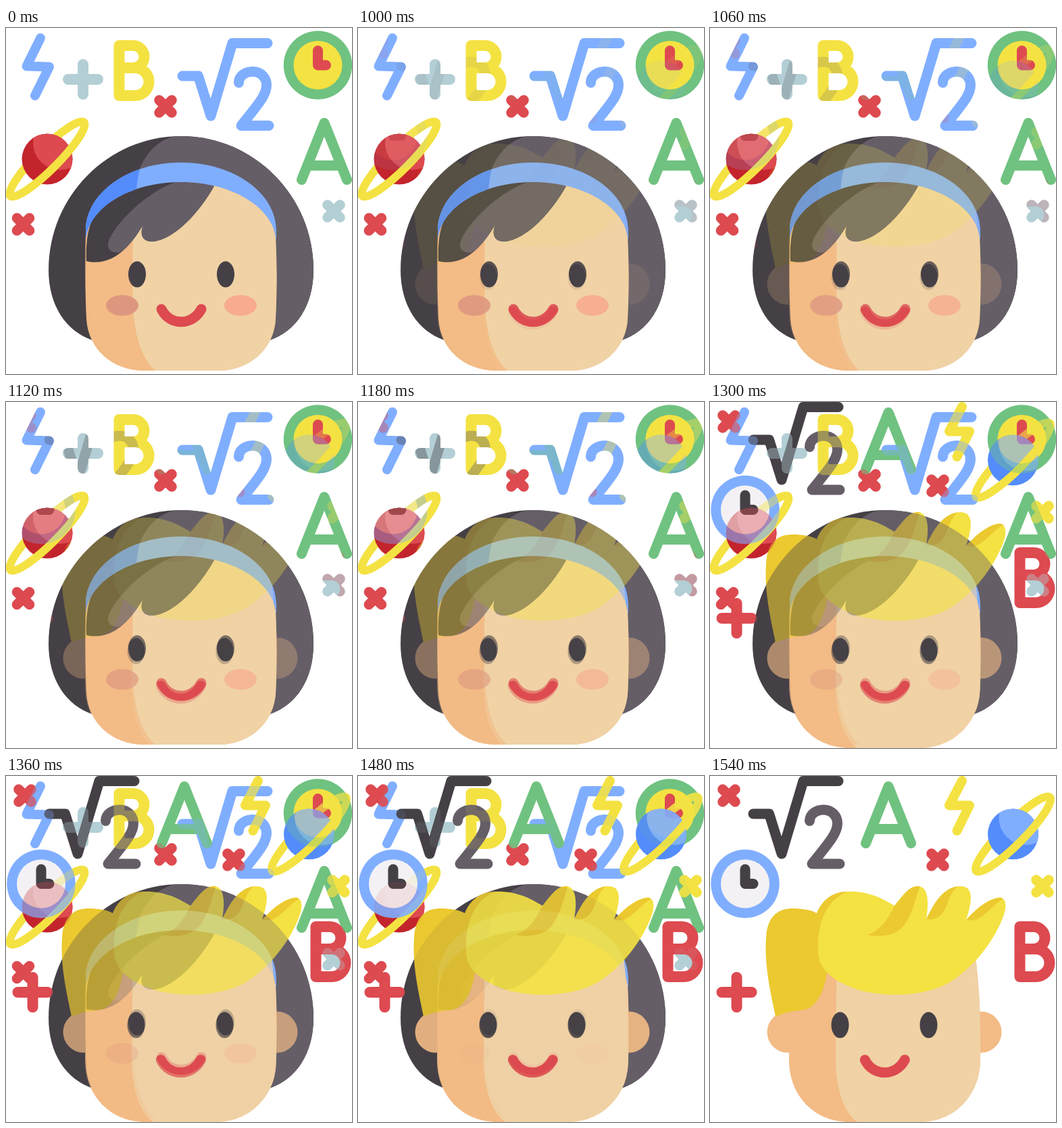
Write an HTML page with a canvas that moves like this. It is 512 px wide and 512 px high and loops after 2540 ms.

```html
<!DOCTYPE html>
<html lang="en">
<head>
<meta charset="utf-8">
<title>Students</title>
<style>
  html, body { margin: 0; width: 100%; height: 100%; overflow: hidden; background: #fff; }
  canvas { display: block; width: 100vw; height: 100vh; }
</style>
</head>
<body>
<canvas id="stage" width="512" height="512"></canvas>
<script>
const SIZE = 512;
const HOLD = 1000, STEP = 60, STEPS = 9, LOOP = 2540;

const C = {
  blue: '#80aeff', deepBlue: '#548cfb', yellow: '#f4e242', gold: '#ebc92f',
  red: '#dd4a50', deepRed: '#c4242c', green: '#70c280', mist: '#b3cfd5',
  dark: '#454045', grey: '#655e67', skin: '#f0d2a5', shade: '#f3bb85', pale: '#f3f1f3'
};

const GLYPH = {
  plus: 'M-22 0H22M0-22V22',
  cross: 'M-9.3-9.3L9.3 9.3M9.3-9.3L-9.3 9.3',
  root: 'M261 71H284.5L303 130L335 22.5H387',
  two: 'M344.5 81C344.5 71 354 64.5 365 64.5C377 64.5 385.5 73.5 385.5 84.5C385.5 99 374 112 348 144.5H389',
  b: 'M167.5 59H188A16.5 16.5 0 0 0 188 26H167.5V100H191A20.5 20.5 0 0 0 191 59',
  a: 'M437.5 224.5L471 140.5L504.5 224.5M447 203.5H495',
  hands: 'M0-21.5V0H12',
  smile: 'M230 416C242 441 276 441 289 416'
};

function makeScene(paint) {
  const canvas = document.createElement('canvas');
  canvas.width = canvas.height = SIZE;
  const g = canvas.getContext('2d');
  g.lineCap = g.lineJoin = 'round';
  paint(brush(g));
  return canvas;
}

function brush(g) {
  const fill = (d, color) => {
    g.fillStyle = color;
    g.fill(new Path2D(d));
  };
  const line = (d, color, x = 0, y = 0, width = 15) => {
    g.save();
    g.translate(x, y);
    g.strokeStyle = color;
    g.lineWidth = width;
    g.stroke(new Path2D(d));
    g.restore();
  };
  const oval = (x, y, rx, ry, color) => {
    g.fillStyle = color;
    g.beginPath();
    g.ellipse(x, y, rx, ry, 0, 0, 7);
    g.fill();
  };
  // Fills a shape, then a second tone limited to that shape.
  const twoTone = (d, base, part, tone) => {
    fill(d, base);
    g.save();
    g.clip(new Path2D(d));
    fill(part, tone);
    g.restore();
  };
  const clock = (x, y, rim, dial, hand) => {
    oval(x, y, 50.7, 50.7, rim);
    oval(x, y, 36, 36, dial);
    line(GLYPH.hands, hand, x, y);
  };
  const planet = (x, y, base, lit) => {
    const ring = (from, to) => {
      g.strokeStyle = C.yellow;
      g.lineWidth = 12;
      g.beginPath();
      g.ellipse(x, y, 77, 15.5, -Math.PI / 4, from, to);
      g.stroke();
    };
    g.save();
    ring(Math.PI, Math.PI * 2);
    g.translate(x, y);
    twoTone('M-37.5 0a37.5 37.5 0 1 0 75 0a37.5 37.5 0 1 0-75 0Z', base,
      'M-21-24a40 40 0 1 0 80 0a40 40 0 1 0-80 0Z', lit);
    g.translate(-x, -y);
    ring(0, Math.PI);
    g.restore();
  };
  const face = (dx, dy) => {
    for (const x of [194, 325]) oval(x + dx, 364.5 + dy, 13, 19.3, C.dark);
    line(GLYPH.smile, C.red, dx / 2, dy);
  };
  return { fill, line, oval, twoTone, clock, planet, face };
}

const girl = makeScene(({ line, oval, twoTone, clock, planet, face }) => {
  line('M51 15L30.5 56.5L64 57.5L43 100', C.blue, 0, 0, 14);
  line(GLYPH.plus, C.mist, 114, 76, 16);
  line(GLYPH.b, C.yellow, 0, 0, 16);
  line(GLYPH.cross, C.red, 236, 116);
  line(GLYPH.root, C.blue);
  line(GLYPH.two, C.blue);
  clock(461.5, 55, C.green, C.yellow, C.red);
  line(GLYPH.a, C.green);
  line(GLYPH.cross, C.mist, 485, 271);
  line(GLYPH.cross, C.red, 25.5, 290.5);
  planet(61, 194, C.deepRed, C.red);

  twoTone('M259 160C151 160 63 249 63 358C63 411 89 449 128 462H390C429 449 455 411 455 358C455 249 367 160 259 160Z', C.dark,
    'M259 159C226 161 202 188 192 225L260 480H512V100H259Z', C.grey);

  twoTone('M118 300C130 255 185 220 259 220C335 220 392 255 399 310C401 350 401 390 399 430C397 475 360 507 315 507H203C158 507 121 475 119 430C117 390 117 350 118 300Z', C.shade,
    'M190 200C187 300 187 350 187.5 400C188 450 200 490 222 508H512V200Z', C.skin);

  twoTone('M119 345C118 290 125 228 259 226C280 226 295 229 308 234C288 270 250 314 216 316C203 316 197 307 203 291C185 322 158 354 119 345Z', C.dark,
    'M264 224C205 238 150 303 151 322C152 331 160 333 168 332C185 318 230 325 230 325H330V224Z', C.grey);

  twoTone('M118 300C118 244 181 199 259 199C337 199 400 244 400 300V316C398 267 336 228 259 228C182 228 120 267 118 316Z', C.blue,
    'M202 195C197 210 194 225 192 250L100 330V195Z', C.deepBlue);

  oval(172, 410.5, 24, 15.3, '#de977f');
  oval(347, 410.5, 24, 15.3, '#f8ab8f');
  face(0, 0);
});

const boy = makeScene(({ fill, line, oval, twoTone, clock, planet, face }) => {
  line(GLYPH.cross, C.red, 28, 29);
  line(GLYPH.root, C.dark, -197, -15);
  line(GLYPH.two, C.grey, -197, -14.5);
  line(GLYPH.a, C.green, -207, -125);
  line('M373 7L354 43.5H384L365.5 81', C.yellow, 0, 0, 14);
  planet(448.5, 86, C.deepBlue, C.blue);
  line(GLYPH.cross, C.red, 337, 124);
  line(GLYPH.cross, C.yellow, 492, 163);
  clock(52, 159.5, C.blue, C.pale, C.dark);
  line(GLYPH.b, C.red, 291, 197, 16);
  line(GLYPH.plus, C.red, 39.5, 320, 16);

  oval(115, 379, 30.5, 30.5, C.shade);
  oval(401, 379, 30.5, 30.5, C.shade);
  twoTone('M117 330L160 260H392C398 310 401 350 400 420C399 475 360 512 310 512H206C156 512 117 475 117 420Z', C.shade,
    'M189 240C187 300 186 360 186 420C186 462 198 499 219 513H512V240Z', C.skin);

  fill('M97 356C90 322 80 280 83 240C84 211 98 196 122 196C137 196 149 198 158 203C166 183 182 171 203 171L240 200L174 286C168 328 153 347 131 347C115 349 105 352 97 356Z', C.gold);
  twoTone('M203 171C235 170 255 181 273 192C285 178 293 164 307 163C322 163 325 183 320 212C331 190 344 164 370 163C390 163 389 183 379 213C394 196 414 180 430 180C441 183 438 200 432 213C415 254 382 290 350 308C310 328 250 327 215 315C180 302 160 285 160 260C158 215 173 184 203 171Z', C.yellow,
    'M312 160C303 182 302 200 287 221C275 237 250 239 233 235C252 229 262 214 273 192L290 160Z' +
    'M369 161C353 173 353 191 344 203C338 211 329 213 320 212L335 160Z' +
    'M438 180C421 187 411 204 397 211C391 214 384 214 379 213L410 178Z', C.gold);

  face(-1.5, 4);
});

const ctx = document.getElementById('stage').getContext('2d');

function layer(scene, mode = 'source-over', alpha = 1) {
  ctx.globalCompositeOperation = mode;
  ctx.globalAlpha = alpha;
  ctx.drawImage(scene, 0, 0);
}

function draw(time) {
  const step = Math.max(0, Math.floor((time - HOLD) / STEP) + 1);
  ctx.clearRect(0, 0, SIZE, SIZE);
  if (step > STEPS) {
    layer(boy);
    return;
  }
  layer(girl);
  if (step) layer(boy, 'source-atop', step / 10);
  // Past the halfway step, the parts outside the first picture turn solid.
  if (step > 5) layer(boy, 'destination-over');
}

const start = performance.now();
function tick() {
  draw((performance.now() - start) % LOOP);
  requestAnimationFrame(tick);
}
tick();
</script>
</body>
</html>
```
